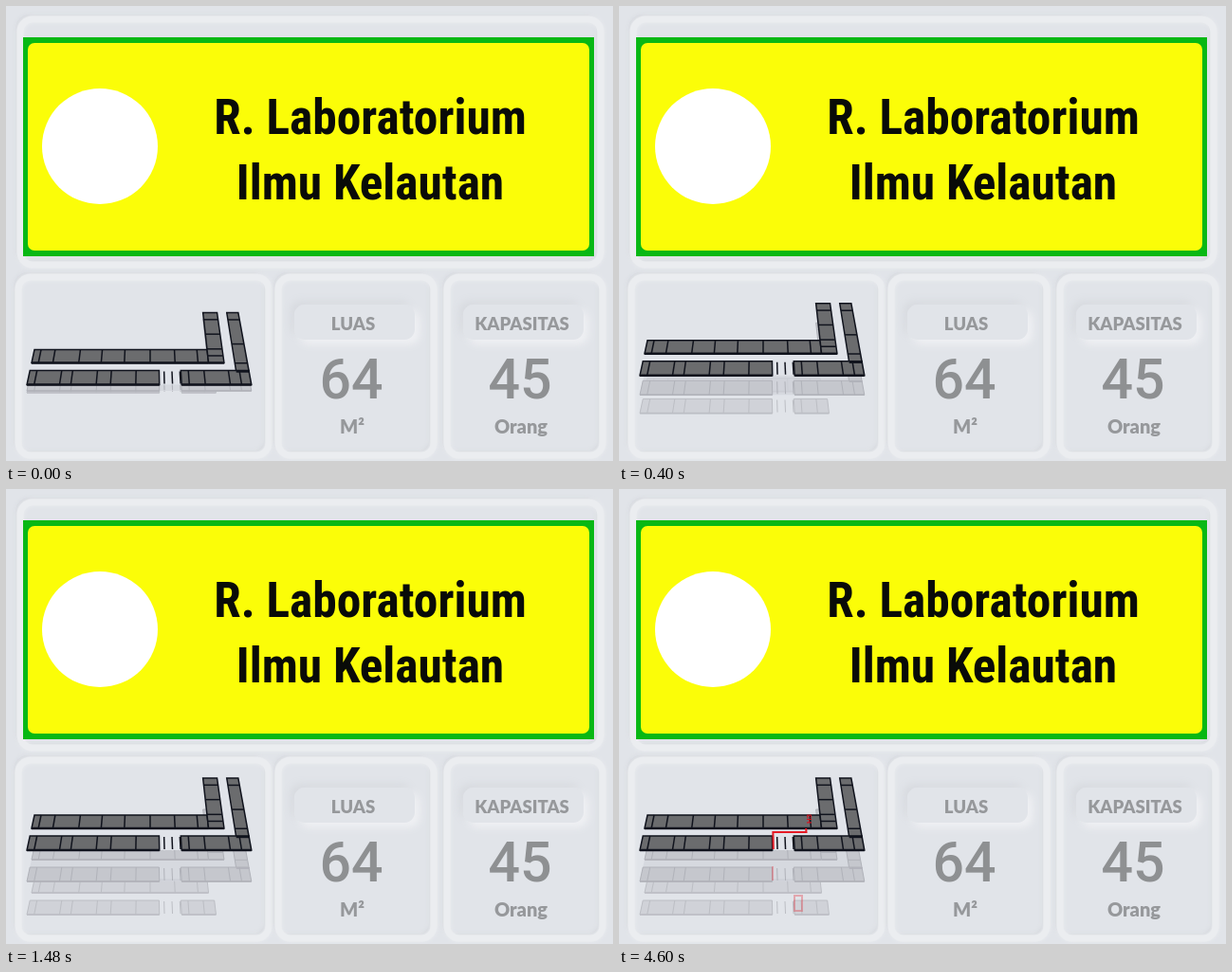
An HTML page with a canvas that plays this animation: 640 by 480 pixels, repeating every 5120 ms.

```html
<!DOCTYPE html>
<html lang="id">
<head>
<meta charset="utf-8">
<title>R. Laboratorium Ilmu Kelautan</title>
<style>
html, body { margin: 0; width: 100%; height: 100%; overflow: hidden; background: #e1e4e9; }
canvas { display: block; }
</style>
</head>
<body>
<canvas id="stage" width="640" height="480"></canvas>
<script>
const LOOP = 5120;
const RISE_END = 760;
const ROUTE_START = 2200, ROUTE_TIME = 320;
const BASE = '#e1e4e9', LIGHT = '#ebedf0', SHADE = '#d7dadf';
const ctx = document.getElementById('stage').getContext('2d');

const clamp01 = v => Math.min(1, Math.max(0, v));
const mix = (a, b, k) => a + (b - a) * k;

function seeded(seed) {
  return () => (seed = (seed * 16807) % 2147483647) / 2147483647;
}

function fillRound(c, x, y, w, h, r, color) {
  c.fillStyle = color;
  c.beginPath();
  c.roundRect(x, y, w, h, r);
  c.fill();
}

function text(c, value, x, y, font, color) {
  c.font = font;
  c.fillStyle = color;
  c.textAlign = 'center';
  c.fillText(value, x, y);
}

// A soft rim: a shaded line outside and a lighter band on top of it.
function drawRim(c, x, y, w, h) {
  for (const [color, width, shift] of [[SHADE, 4, -3], [LIGHT, 7, 0]]) {
    c.save();
    c.strokeStyle = c.shadowColor = color;
    c.shadowBlur = 4;
    c.lineWidth = width;
    c.beginPath();
    c.roundRect(x + shift, y + shift, w, h, 13);
    c.stroke();
    c.restore();
  }
}

function drawPill(c, x, y, w, h) {
  c.save();
  c.shadowBlur = 8;
  for (const [color, shift] of [[SHADE, -4], ['#f0f1f4', 5]]) {
    c.shadowColor = color;
    c.shadowOffsetX = c.shadowOffsetY = shift;
    fillRound(c, x, y, w, h, 11, BASE);
  }
  c.restore();
}

function drawCard(c, x, title, value, unit) {
  drawRim(c, x - 78, 286, 164, 188);
  drawPill(c, x - 61, 315, 127, 37);
  text(c, title, x + 1, 342, '900 18.5px Lato, sans-serif', '#96989b');
  text(c, value, x - 1, 414, '500 59px Roboto, sans-serif', '#8e9092');
  text(c, unit, x, 451, '900 20px Lato, sans-serif', '#96989b');
}

function makeBackdrop() {
  const layer = document.createElement('canvas');
  layer.width = 640;
  layer.height = 480;
  const c = layer.getContext('2d');
  c.fillStyle = BASE;
  c.fillRect(0, 0, 640, 480);

  drawRim(c, 15, 14, 612, 259);
  drawRim(c, 13, 286, 264, 188);
  drawCard(c, 365, 'LUAS', '64', 'M²');
  drawCard(c, 543, 'KAPASITAS', '45', 'Orang');

  c.fillStyle = '#08b814';
  c.fillRect(18, 33, 602, 231);
  fillRound(c, 23, 39, 592, 219, 7, '#fbfd08');
  c.fillStyle = '#fff';
  c.beginPath();
  c.arc(99, 148, 61, 0, Math.PI * 2);
  c.fill();

  const sign = 'bold condensed 51.4px "Roboto Condensed", Roboto, sans-serif';
  text(c, 'R. Laboratorium', 384, 135, sign, '#090b08');
  text(c, 'Ilmu Kelautan', 384, 204, sign, '#090b08');
  return layer;
}

// The plan is made of upright rectangles seen in slight perspective.
const BACK = [30, 344, 212, 358];
const FRONT_LEFT = [30, 366, 161, 381];
const FRONT_RIGHT = [183, 366, 252, 381];
const WING_LEFT = [212, 305, 228, 358];
const WING_RIGHT = [239, 305, 252, 367];
const BLOCKS = [BACK, FRONT_LEFT, WING_LEFT, WING_RIGHT, FRONT_RIGHT];
const GROUND_BLOCKS = [BACK, FRONT_LEFT, [183, 366, 217, 381]];
const FLOORS = [[30, 344, 252, 381], [212, 305, 252, 345]];

const project = (x, y) => [150 + (x - 150) * (1 + (y - 344) * 0.0018), y];

function tracePath(points) {
  ctx.beginPath();
  for (const [x, y] of points) ctx.lineTo(...project(x, y));
}

function traceRect([x0, y0, x1, y1]) {
  tracePath([[x0, y0], [x1, y0], [x1, y1], [x0, y1]]);
  ctx.closePath();
}

function drawBlock(block, index) {
  const [x0, y0, x1, y1] = block;
  traceRect(block);
  ctx.fill();
  ctx.stroke();

  const random = seeded(index * 977 + 41);
  const wide = x1 - x0 > y1 - y0;
  const end = wide ? x1 : y1;
  const step = () => 7 + random() * 20;
  for (let p = (wide ? x0 : y0) + step(); p < end - 4; p += step()) {
    tracePath(wide ? [[p, y0], [p, y1]] : [[x0, p], [x1, p]]);
    ctx.stroke();
  }
}

function drawStorey(dy, blocks, style) {
  ctx.save();
  ctx.translate(0, dy);
  ctx.fillStyle = style.floor;
  if (blocks === BLOCKS) {
    FLOORS.forEach(rect => {
      traceRect(rect);
      ctx.fill();
    });
  }
  ctx.fillStyle = style.room;
  ctx.strokeStyle = style.wall;
  ctx.lineWidth = style.width;
  blocks.forEach(drawBlock);

  // Stairwell between the two front blocks.
  for (let x = 166; x < 183; x += 8) {
    tracePath([[x, 367], [x, 380]]);
    ctx.stroke();
  }
  ctx.lineWidth = style.width * 1.6;
  for (const [x0, , x1, y1] of blocks) {
    tracePath([[x0, y1], [x1, y1]]);
    ctx.stroke();
  }
  ctx.restore();
}

const SOLID = { floor: '#e0e3e9', room: '#6b6c6e', wall: '#10131d', width: 1.5 };
const MIDDLE = { floor: 'rgba(210,213,220,.7)', room: '#c5c7cd', wall: '#b0b2b9', width: 1 };
const GROUND = { floor: BASE, room: '#d0d2d8', wall: '#bcbec4', width: 1 };

function drawRoute(opacity) {
  ctx.save();
  ctx.globalAlpha = opacity;
  ctx.strokeStyle = '#e51a25';
  ctx.lineWidth = 2;
  tracePath([[162, 380], [162, 362], [196, 362], [196, 358]]);
  ctx.stroke();

  ctx.save();
  ctx.translate(203, 348);
  ctx.rotate(-Math.PI / 2);
  text(ctx, 'H3', 0, 0, 'bold 8px Roboto, sans-serif', '#d51420');
  ctx.restore();

  ctx.globalAlpha = opacity * 0.3;
  ctx.fillStyle = ctx.strokeStyle;
  ctx.fillRect(161, 398, 2, 15);
  ctx.strokeRect(185, 429, 8, 16);
  ctx.restore();
}

const backdrop = makeBackdrop();

function render(time) {
  const t = Math.floor((time % LOOP) / 40) * 40;
  const rise = clamp01(t / RISE_END);
  ctx.drawImage(backdrop, 0, 0);
  drawStorey(mix(27, 68, rise), GROUND_BLOCKS, GROUND);
  drawStorey(mix(25, 33, rise), BLOCKS, MIDDLE);
  drawStorey(mix(18.5, 0, rise), BLOCKS, SOLID);
  const shown = clamp01((t - ROUTE_START) / ROUTE_TIME);
  if (shown > 0) drawRoute(shown);
}

const start = performance.now();
function tick() {
  render(performance.now() - start);
  requestAnimationFrame(tick);
}
tick();
</script>
</body>
</html>
```
